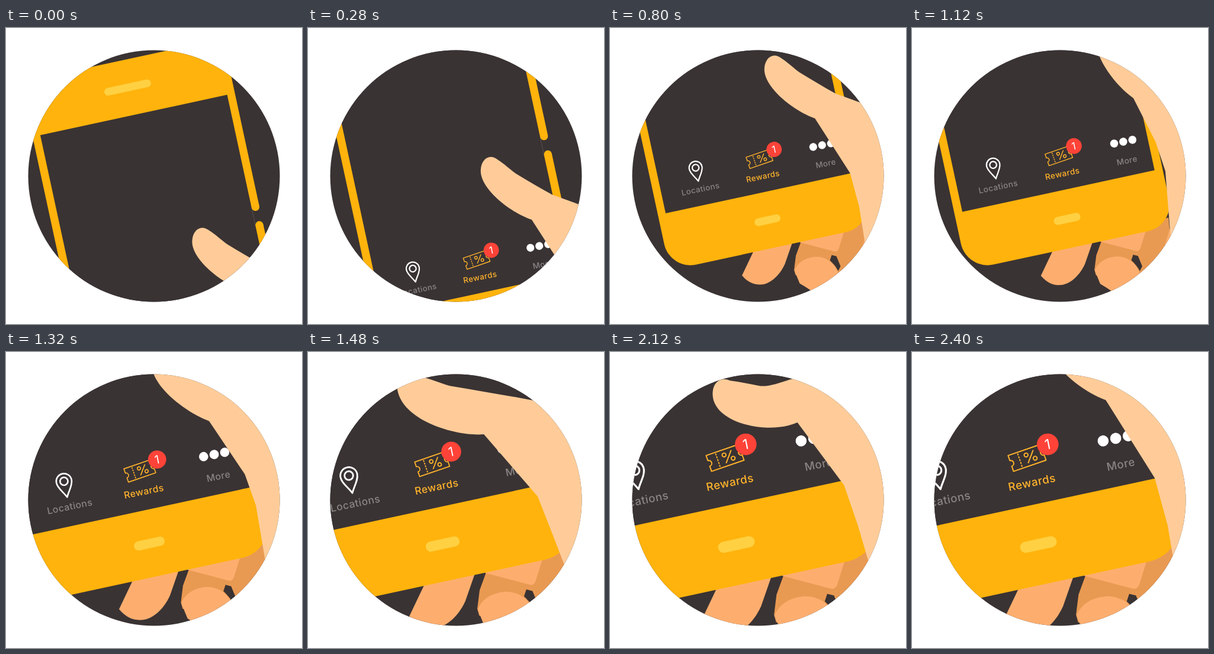
An HTML page that plays this animation: 500 by 500 pixels, repeating every 3.4 s.

```html
<!DOCTYPE html>
<html lang="en">
<head>
<meta charset="utf-8">
<title>Rewards tap</title>
<style>
html, body { margin: 0; width: 100%; height: 100%; overflow: hidden; background: #fff; }
svg { display: block; width: 100%; height: 100%; }
text { font: 500 13.3px Inter, Roboto, sans-serif; letter-spacing: .4px; text-anchor: middle; }

.dark { fill: #3a3333; }
.amber { fill: #ffb30c; }
.glow { fill: #ffd042; }
.finger { fill: #fdae6f; }
.shade { fill: #e99a52; }
.label { fill: #8a8484; }
.line { fill: none; stroke-linecap: round; stroke-linejoin: round; }

#zoom, #pan, #thumb { animation: 3400ms infinite; }
#zoom { animation-name: zoom; transform-origin: 391px 315px; }
#pan { animation-name: pan; }
#thumb { fill: #fc9; animation-name: thumb; }

@keyframes pan {
  0% { transform: translate(55.6px, 292.3px); animation-timing-function: cubic-bezier(.33, 0, .28, 1); }
  26.47%, 100% { transform: translate(0, 0); }
}
@keyframes zoom {
  0%, 28.97% { transform: scale(1); animation-timing-function: cubic-bezier(.33, 0, .28, 1); }
  58.82%, 100% { transform: scale(1.415); }
}
/* rest, lift, swing, tap, return */
@keyframes thumb {
  0%, 22.35% {
    d: path("M345 151C305 137 256 96 259 66C260 50 273 38 288 50C298 56 308 66 318 73C338 85 360 98 380 109C405 118 435 128 500 155L520 420L432 372L420 300L405 244Z");
    animation-timing-function: ease-in-out;
  }
  32.94% {
    d: path("M374.4 124C340 99.5 304 46.6 315 18.6C320 4 335 -2 347.7 10C356 18 364 32 370 41.5C385 58 402 76 419.6 93C440 105 470 120 500 140L520 420L437 372L427 244L411 196Z");
    animation-timing-function: cubic-bezier(.4, 0, .75, .8);
  }
  43.53% {
    d: path("M318.9 180C285 183 214 163 207 122C205 100 222 98 245 107C255 110 264 114 275 117C310 123 345 129 382 136C410 142 450 152 500 165L520 420L432 372L404.2 300L388.7 260.6Z");
    animation-timing-function: cubic-bezier(.2, .4, .5, 1);
  }
  55.29% {
    d: path("M332.5 197.3C299 237 213 245 215 204C215 194 220 190 228 189C243 187 262 185 273 182C290 174 312 139 326 132C340 125 372 140 500 190L520 420L432 372L403 298L386 258Z");
    animation-timing-function: ease-in-out;
  }
  70.59%, 100% {
    d: path("M346 149.8C305 135 262 88 266 58C268 44 281 34 296 46C305 52 313 62 322 70C341 83 362 97 382 108C407 118 437 128 500 155L520 420L432 372L420 300L404.5 243Z");
  }
}
</style>
</head>
<body>
<svg viewBox="0 0 500 500">
  <clipPath id="disc"><circle cx="250" cy="250" r="212.5"/></clipPath>
  <g clip-path="url(#disc)">
    <rect class="dark" width="500" height="500"/>
    <g id="zoom"><g id="pan">

      <!-- fingers behind the phone -->
      <path class="finger" d="M249 360L222.5 415.6C233 428 243 431 253 431C268 431 285 418 295 396L311 350Z"/>
      <path class="shade" d="M320 345L321.7 359.5L313.5 382L310.5 406L313 415L380 420L385 440L440 400L432 320Z"/>
      <path class="finger" d="M320 345V359.5L379 375Q383.5 376 386 370L396 338Z"/>
      <path class="finger" d="M311 407C318 390 335 384 350 384C366 385 378 394 385 411L384 440L345 445L330 435L320 429Z"/>
      <path class="dark" d="M374 381L382 383L389 400L385 408C381 400 377 396 371 390Z"/>
      <path class="finger" d="M431 240L437 330L420 385H445V240Z"/>

      <!-- phone, origin at the lower left corner of its screen -->
      <g transform="translate(93.5 310.6) rotate(-12.2)">
        <rect class="amber" x="-13.3" y="-526" width="349.6" height="621.5" rx="45"/>
        <rect class="dark" y="-431.6" width="323" height="431.6"/>
        <rect class="dark" x="322.5" y="-236.2" width="15" height="31.2"/>
        <path class="line" d="M323 -236V-205" stroke="#6f6868" stroke-width=".5"/>
        <circle class="amber" cx="329.65" cy="-236.2" r="6.65"/>
        <circle class="amber" cx="329.65" cy="-205" r="6.65"/>
        <rect class="glow" x="121" y="-485.6" width="80.5" height="13" rx="6.5"/>
        <rect class="glow" x="143.5" y="41.1" width="44.5" height="13.2" rx="6.6"/>

        <g transform="rotate(.7 174 -26)">
          <g class="line" stroke="#fff" stroke-width="2.2" transform="translate(65.3 -63.2)">
            <path d="M0 23C-4 14.5 -11 8 -11 0a11 11 0 0 1 22 0C11 8 4 14.5 0 23Z"/>
            <circle r="5.6"/>
          </g>
          <text class="label" x="66.2" y="-21.7">Locations</text>

          <g class="line" stroke="#ffb32b" stroke-width="1.4" transform="translate(174 -56.3) rotate(-7.5)">
            <path d="M-20.5 -10H20.5V-3.5a3.5 3.5 0 0 0 0 7V10H-20.5V3.5a3.5 3.5 0 0 0 0 -7Z"/>
            <path d="M-9 -8V8" stroke-dasharray="1.2 2.4"/>
            <path d="M9.5 -6L-.5 6"/>
            <circle cx="0" cy="-3.6" r="2.3"/>
            <circle cx="9" cy="3.6" r="2.3"/>
          </g>
          <text x="173.8" y="-21.7" fill="#ffb32b">Rewards</text>
          <circle cx="201.4" cy="-67.2" r="12.9" fill="#ff4338"/>
          <text x="201.2" y="-61.4" fill="#fff" style="font-size:16.5px;font-weight:400;letter-spacing:0">1</text>

          <g fill="#fff">
            <circle cx="267" cy="-58" r="6.6"/>
            <circle cx="282.3" cy="-58" r="6.6"/>
            <circle cx="297.6" cy="-58" r="6.6"/>
          </g>
          <text class="label" x="282.1" y="-21.7">More</text>
        </g>
      </g>

      <path id="thumb" d="M345 151C305 137 256 96 259 66C260 50 273 38 288 50C298 56 308 66 318 73C338 85 360 98 380 109C405 118 435 128 500 155L520 420L432 372L420 300L405 244Z"/>
    </g></g>
  </g>
</svg>
</body>
</html>
```
